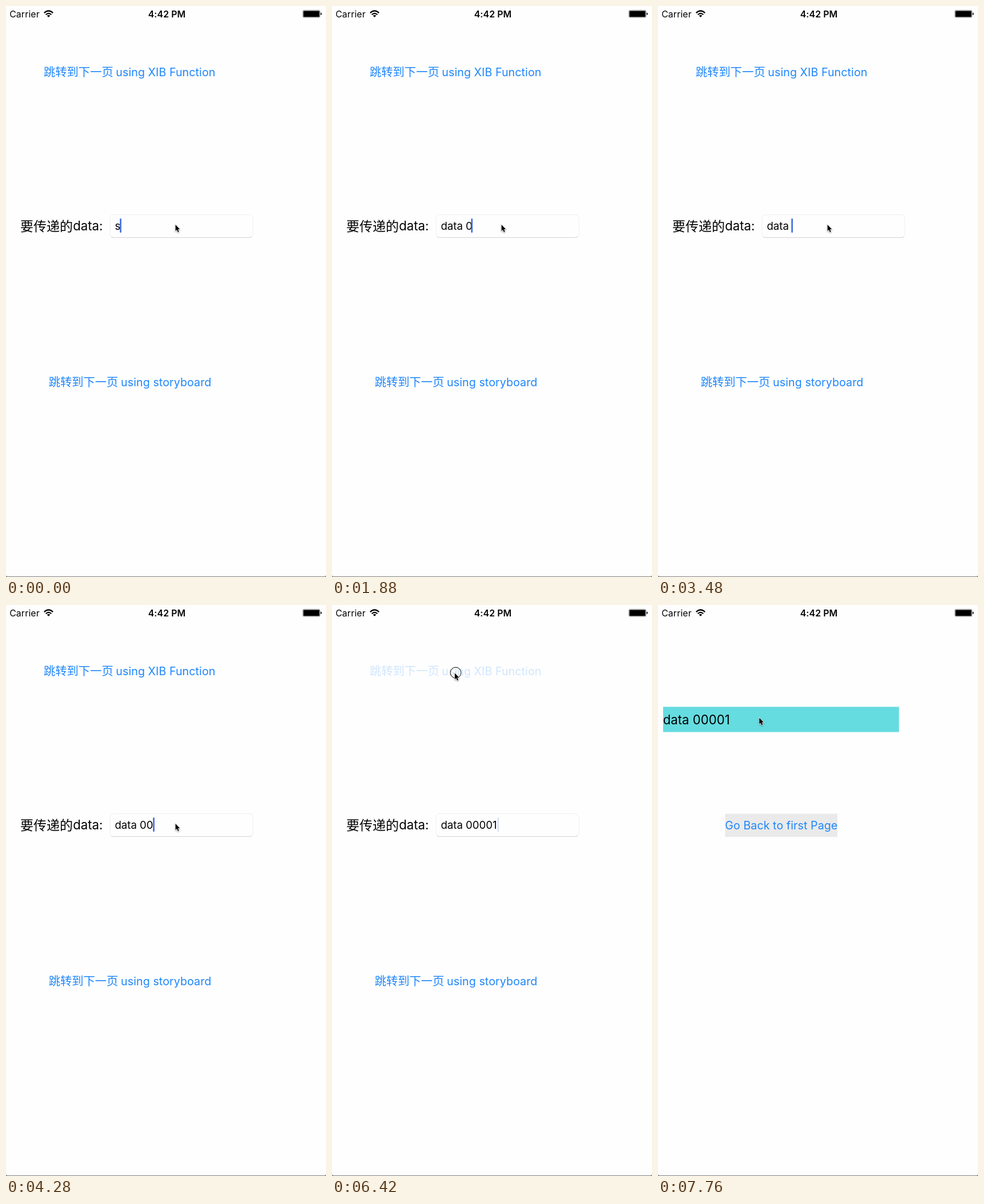
Animation, 560 px wide and 1000 px high, one loop 8 s. Source, as an HTML page:

```html
<!DOCTYPE html>
<html lang="zh">
<head>
<meta charset="utf-8">
<title>Passing data between pages</title>
<style>
  html, body { margin: 0; width: 100%; height: 100%; overflow: hidden; background: #fefefe; }
  svg { display: block; width: 560px; height: 1000px; }
  text { font-family: Inter, "Noto Sans CJK SC", "Noto Sans CJK", sans-serif; white-space: pre; }
  .cjk { font-family: "Noto Sans CJK SC", "Noto Sans CJK", sans-serif; }
  .status { font-size: 15.8px; letter-spacing: .13px; }
  .link { font-size: 19.6px; letter-spacing: .09px; fill: #1e86fb; }
  .link .cjk { font-size: 20.3px; letter-spacing: 0; }
  .label { font-size: 22.2px; }
  .label .cjk { font-size: 23px; }
  .input { font-size: 18.6px; }
  #pointer path { filter: drop-shadow(0 1px 1px rgba(0, 0, 0, .4)); }
</style>
</head>
<body>
<svg viewBox="0 0 560 1000" xmlns="http://www.w3.org/2000/svg">
  <rect y="990" width="560" height="10" fill="#808080"/>
  <rect y="-10" width="560" height="1009" rx="3" fill="#fefefe"/>

  <g id="statusBar">
    <text class="status" x="6.2" y="20">Carrier</text>
    <g fill="none" stroke="#000" stroke-width="2.2">
      <path d="M66.8 12.2Q74.5 4.8 82.2 12.2"/>
      <path d="M69.7 15.2Q74.5 10.6 79.3 15.2"/>
    </g>
    <path d="M71.8 17Q74.5 14.6 77.2 17L74.5 19.8Z"/>
    <text class="status" x="281.5" y="20" text-anchor="middle" font-weight="600">4:42 PM</text>
    <rect x="519.4" y="7.4" width="30.2" height="12.8" rx="2" fill="#fefefe" stroke="#777" stroke-width=".7"/>
    <rect x="520.4" y="8.4" width="28.2" height="10.8" rx="1"/>
    <path d="M550.6 11.6Q552.6 12 552.6 13.8T550.6 16Z"/>
  </g>

  <g id="first">
    <g class="link" id="xibLink">
      <text class="cjk" x="66" y="122.8">跳转到下一页</text>
      <text x="192.3" y="122.6">using XIB Function</text>
    </g>
    <g class="label">
      <text class="cjk" x="25" y="393.6">要传递的</text>
      <text x="117.2" y="393.3">data:</text>
    </g>
    <rect x="182" y="365.5" width="250" height="40" rx="6.5" fill="#fefefe" stroke="#eee"/>
    <path d="M184 404Q186 405.5 188.5 405.5H425.5Q428 405.5 430 404" fill="none" stroke="#d2d2d2"/>
    <text class="input" id="typed" x="190.4" y="391.6"></text>
    <rect id="caret" y="372.3" width="2.7" height="24.6" rx=".8" fill="#426fe0"/>
    <g class="link">
      <text class="cjk" x="74.7" y="665.8">跳转到下一页</text>
      <text x="201.1" y="665.6">using storyboard</text>
    </g>
  </g>

  <g id="second">
    <rect x="9" y="178.3" width="412.7" height="44.2" fill="#65dce0"/>
    <text class="label" x="8.7" y="208.8">data 00001</text>
    <rect x="117.5" y="365.5" width="196.5" height="40.8" fill="#eaeaea"/>
    <text class="link" x="215.8" y="392.8" text-anchor="middle">Go Back to first Page</text>
  </g>

  <circle id="touch" cx="216.5" cy="118.5" r="9.4" fill="none" stroke="#000"/>
  <g id="pointer">
    <path d="M.3 .4V11.4L2.7 9.2L4.6 13.4L6.4 12.6L4.6 8.4H7.9Z" stroke="#fff" stroke-width="1.4" paint-order="stroke"/>
  </g>
</svg>
<script>
const LOOP = 8000, PRESS = 6420, SWITCH = 6690;

// [start ms, field text, caret left edge]
const typing = [
  [0, 's', 199.2], [270, '', 191], [540, 'da', 211.3], [810, 'data', 228.2],
  [1080, 'data ', 233.3], [1880, 'data 0', 243.4], [2410, 'data ', 233.3],
  [4280, 'data 00', 257.2], [4550, 'data 000', 268.4], [4810, 'data 00001', 289.4]
];
// [start ms, caret opacity]
const blink = [
  [0, 1], [1610, .55], [1880, 1], [2950, .55], [3220, 0], [3480, 1],
  [4020, .2], [4280, 1], [5350, .55], [5620, 0], [5890, 1], [6420, .2]
];
// [start ms, tip x, tip y]
const moves = [
  [0, 296.3, 382.6], [5350, 195, 35], [5620, 214.3, 79], [5890, 219.8, 127],
  [6160, 214.6, 118.9], [6950, 197.3, 152.6], [7220, 177.4, 196.9],
  [7490, 169.2, 186.8], [7760, 177, 197.2]
];

const $ = id => document.getElementById(id);
const at = (steps, t) => steps.findLast(s => s[0] <= t);
const show = (id, on) => $(id).setAttribute('display', on ? 'inline' : 'none');

function render(t) {
  const [, text, caretX] = at(typing, t);
  const [, x, y] = at(moves, t);
  const pressed = t >= PRESS && t < SWITCH;
  $('typed').textContent = text;
  $('caret').setAttribute('x', caretX);
  $('caret').setAttribute('opacity', at(blink, t)[1]);
  $('pointer').setAttribute('transform', `translate(${x} ${y})`);
  $('xibLink').setAttribute('opacity', pressed ? .2 : 1);
  show('touch', pressed);
  show('first', t < SWITCH);
  show('second', t >= SWITCH);
}

const start = performance.now();
function tick() {
  render((performance.now() - start) % LOOP);
  requestAnimationFrame(tick);
}
tick();
</script>
</body>
</html>
```
